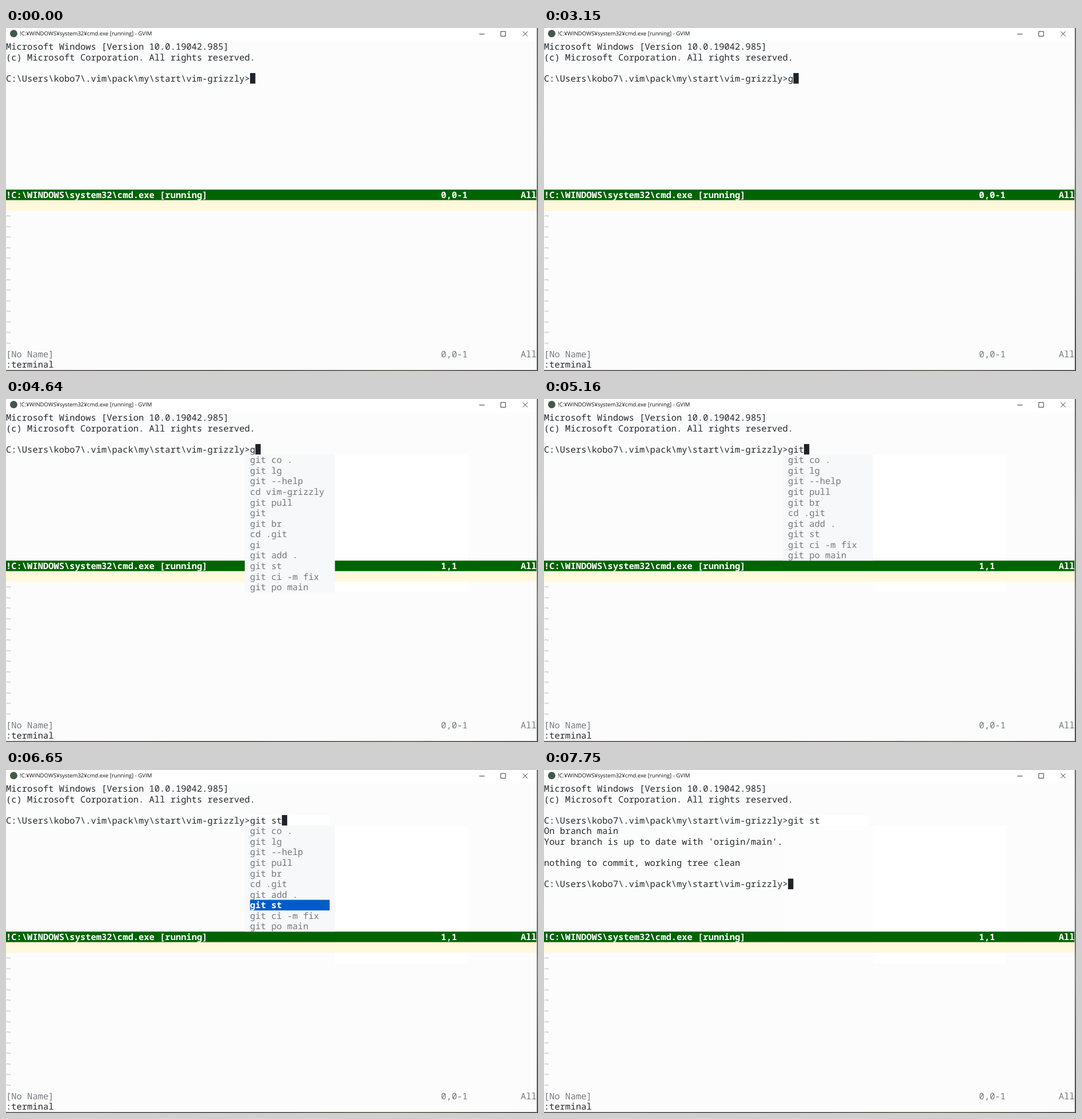
Recreate the animation shown at these times as an HTML page. Size 931 by 601 pixels, loop 8000 ms.

```html
<!DOCTYPE html>
<html lang="en">
<head>
<meta charset="utf-8">
<title>Terminal completion</title>
<style>
  html, body { margin: 0; width: 100%; height: 100%; overflow: hidden; }
  /* A 100 x 31 grid of 10 x 20 cells, shown slightly reduced. */
  #screen {
    position: absolute; left: 0; top: 0; width: 1003px; height: 648px;
    transform: scale(.9285); transform-origin: 0 0; overflow: hidden;
    background: #fcfcfc; color: #24292e;
    font: 16.667px/19px "Noto Sans Mono", monospace;
    font-variant-ligatures: none; text-rendering: geometricPrecision;
  }
  #screen div { position: absolute; white-space: pre; }
  #bar { left: 0; top: 0; width: 1000px; height: 25px; background: #fff; }
  #title {
    left: 26px; top: 1px; color: #111;
    font: 10.35px/20px "Open Sans", "Noto Sans", sans-serif;
  }
  #bar svg { position: absolute; left: 0; top: 0; }
  .cell {
    left: calc(var(--c) * 10px); top: calc(25px + var(--r) * 20px);
    height: 20px;
  }
  .status { background: #006400; }
  .line { background: #fff8dc; }
  .bold { color: #fff; font-weight: 700; }
  .grey { color: #75797e; }
  .tilde { color: #b4b9bf; }
  .clean { background: #fff; }
  .trace { background: #fdfdfe; }
  .cursor { background: #1f2329; }
  .popup { background: #f6f8fa; }
  .pick { width: 150px; background: #005cc5; }
  #right {
    left: 1000px; top: 0; width: 3px; height: 648px; border-left: 1px solid #999;
    background: linear-gradient(#4b4038, #5b4b50 20%, #70606a 35%, #5a4728 48%, #856b1c 58%, #54451f 72%, #2b2517 88%, #1b1810);
  }
  #bottom {
    left: 0; top: 645px; width: 1001px; height: 3px; border-top: 1px solid #999;
    background: linear-gradient(90deg, #4a4030, #2e2820 40%, #554529 75%, #211d14);
  }
</style>
</head>
<body>
<div id="screen">
  <div id="bar">
    <svg width="1000" height="25" fill="none" stroke="#222">
      <circle cx="14.5" cy="10.5" r="7" fill="#43584b" stroke="none"/>
      <path d="M892 11.5h10M932.5 6.5h9v9h-9z"/>
      <path d="M974 6.5l9 9m0-9l-9 9"/>
    </svg>
    <div id="title">!C:¥WINDOWS¥system32¥cmd.exe [running] - GVIM</div>
  </div>
  <div id="under"></div>
  <div id="fixed"></div>
  <div id="live"></div>
  <div id="right"></div>
  <div id="bottom"></div>
</div>
<script>
const LOOP = 8000;
const PROMPT = "C:\\Users\\kobo7\\.vim\\pack\\my\\start\\vim-grizzly>";
const COL = PROMPT.length;
const layer = id => document.getElementById(id);
const under = layer("under"), fixed = layer("fixed"), live = layer("live");

function put(parent, row, col, text, cls = "") {
  const el = document.createElement("div");
  el.className = "cell " + cls;
  el.style.setProperty("--r", row);
  el.style.setProperty("--c", col);
  el.textContent = text;
  parent.append(el);
  return el;
}

function block(parent, row, col, rows, cols, cls) {
  const { style } = put(parent, row, col, "", cls);
  style.height = rows * 20 + "px";
  style.width = cols * 10 + "px";
}

put(fixed, 0, 0, "Microsoft Windows [Version 10.0.19042.985]");
put(fixed, 1, 0, "(c) Microsoft Corporation. All rights reserved.");
put(fixed, 3, 0, PROMPT);
block(fixed, 14, 0, 1, 100, "status");
put(fixed, 14, 0, "!C:\\WINDOWS\\system32\\cmd.exe [running]", "bold");
put(fixed, 14, 97, "All", "bold");
block(fixed, 15, 0, 1, 100, "line");
for (let row = 16; row < 29; row++) put(fixed, row, 0, "~", "tilde");
put(fixed, 29, 0, "[No Name]", "grey");
put(fixed, 29, 82, "0,0-1", "grey");
put(fixed, 29, 97, "All", "grey");
put(fixed, 30, 0, ":terminal");

const wide = ["git co .", "git lg", "git --help", "cd vim-grizzly", "git pull", "git",
  "git br", "cd .git", "gi", "git add .", "git st", "git ci -m fix", "git po main"];
const narrow = wide.filter(s => !["cd vim-grizzly", "git", "gi"].includes(s));

// Each step overrides part of the previous state.
const on = { cursor: true }, off = { cursor: false };
const steps = [
  [0, { typed: "", cursor: true, list: [], pick: "", pos: "0,0-1", trail: 0 }],
  [710, { cursor: false, trail: 1 }], [830, on],
  [1260, off], [1540, on], [1940, off], [2190, on], [2580, off], [2860, on],
  [3150, { typed: "g" }],
  [3580, { list: wide, pos: "1,1", used: true }],
  [3840, off], [4090, on], [4520, off], [4640, on],
  [4790, { typed: "git" }],
  [5160, { list: narrow }],
  [5430, off], [5690, on],
  [6010, { pick: "git po main" }],
  [6130, { typed: "git po main" }],
  [6400, { typed: "git ci -m fix", pick: "git ci -m fix", trail: 15 }],
  [6650, { typed: "git st", pick: "git st" }],
  [7290, { list: [], pick: "" }],
  [7750, { done: true }]
];
let state = {};
const timeline = steps.map(([at, change]) => [at, state = { ...state, ...change }]);

function render(s) {
  under.replaceChildren();
  live.replaceChildren();
  if (s.trail) block(under, 3, COL, 1, s.trail, "clean");
  if (s.used) {
    block(under, 4, 45, 10, 17, "trace");
    block(under, 4, 62, 13, 25, "clean");
  }

  put(live, 14, 82, s.pos, "bold");
  put(live, 3, COL, s.typed);
  if (s.done) {
    put(live, 4, 0, "On branch main");
    put(live, 5, 0, "Your branch is up to date with 'origin/main'.");
    put(live, 7, 0, "nothing to commit, working tree clean");
    put(live, 9, 0, PROMPT);
  }
  if (s.cursor) block(live, s.done ? 9 : 3, COL + (s.done ? 0 : s.typed.length), 1, 1, "cursor");

  if (s.list.length) block(live, 4, 45, s.list.length, 17, "popup");
  s.list.forEach((item, i) =>
    put(live, 4 + i, COL, item, item === s.pick ? "pick bold" : "grey"));
}

let shown = -1;
function tick() {
  const t = performance.now() % LOOP;
  const index = timeline.findLastIndex(([at]) => at <= t);
  if (index !== shown) render(timeline[shown = index][1]);
  requestAnimationFrame(tick);
}
tick();
</script>
</body>
</html>
```
